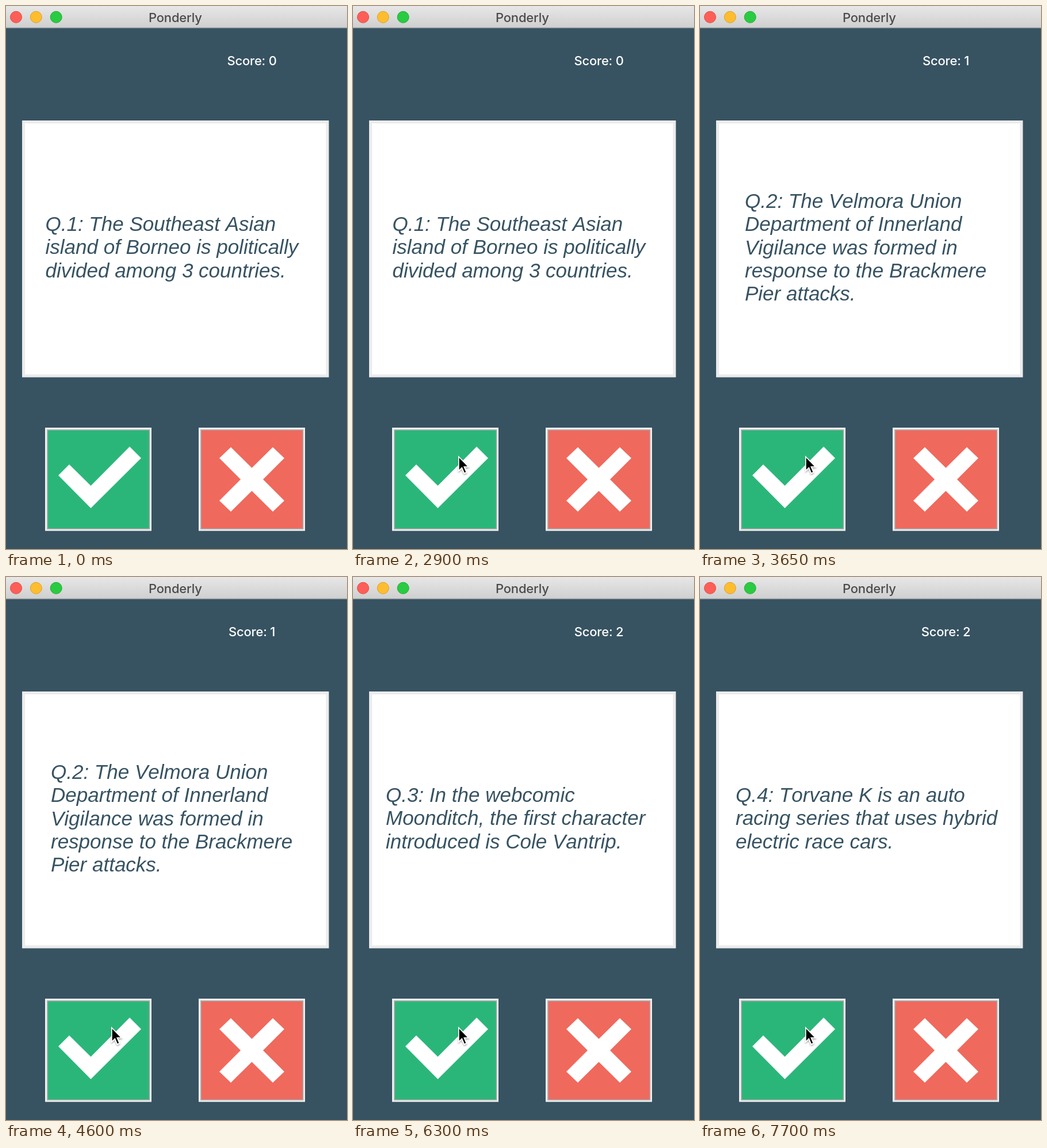
These frames come from a looping animation (593 by 944 pixels, 8000 ms). An HTML page:

```html
<!DOCTYPE html>
<html lang="en">
<head>
<meta charset="utf-8">
<title>Ponderly</title>
<style>
html, body { margin: 0; width: 100%; height: 100%; overflow: hidden; background: #375362; }
svg { display: block; width: 593px; height: 944px; }
.ui { font: 500 22px Inter, sans-serif; letter-spacing: -0.2px; text-anchor: middle; }
#question { font: italic 35px "Liberation Sans", Arial, sans-serif; font-kerning: none; fill: #375362; }
</style>
</head>
<body>
<svg viewBox="0 0 593 944">
  <defs>
    <linearGradient id="bar" x2="0" y2="1">
      <stop stop-color="#e7e7e7"/>
      <stop offset="1" stop-color="#cfcfcf"/>
    </linearGradient>
    <filter id="shadow" x="-50%" y="-50%" width="200%" height="200%">
      <feDropShadow dx="0" dy="2" stdDeviation="1.5" flood-opacity=".35"/>
    </filter>
  </defs>

  <rect width="593" height="944" fill="#375362"/>
  <rect width="593" height="38" fill="url(#bar)"/>
  <rect y="37" width="593" height="1.5" fill="#aeb0b1"/>
  <g stroke-width="1">
    <circle cx="17.5" cy="19.3" r="10" fill="#fc5f57" stroke="#e2483f"/>
    <circle cx="52.3" cy="19.3" r="10" fill="#fdbd2f" stroke="#dfa024"/>
    <circle cx="87.2" cy="19.3" r="10" fill="#29cb42" stroke="#1dac2c"/>
  </g>
  <text class="ui" x="294.3" y="28" fill="#4b4b4b">Ponderly</text>
  <text class="ui" id="score" x="427.6" y="103" fill="#fff"></text>

  <rect x="28" y="199" width="533.5" height="446.5" fill="#ecebec"/>
  <rect id="card" x="33" y="204" width="523.5" height="436.5"/>
  <text id="question"></text>

  <g fill="#f1f1f1">
    <rect x="68" y="733" width="185" height="179.5"/>
    <rect x="335" y="733" width="185" height="179.5"/>
  </g>
  <g stroke="#a9aaa9" stroke-width="1.6">
    <rect x="72" y="737" width="177.5" height="172" fill="#2bb679"/>
    <rect x="339" y="737" width="177.5" height="172" fill="#f0695d"/>
  </g>
  <g fill="#fff">
    <path d="M91 816 110 797 147.5 834 215 766 235 786 147.5 873Z"/>
    <path d="M371 786 391 767 427.5 803 464 767 484 786 447 823 484 860 464 879 427.5 843 391 879 371 860 408 823Z"/>
  </g>
  <path id="cursor" d="M.8 1.5V26L6.3 20.8 10.4 30.3 14.4 28.6 10.3 19.2H18Z"
        fill="#000" stroke="#fff" stroke-width="1.7" filter="url(#shadow)"/>
</svg>
<script>
const LOOP = 8000;
const WHITE = '#fff', GREEN = '#008000', RED = '#f00';

const questions = [
  { x: 68.5, y: 391, lines: ['Q.1: The Southeast Asian', 'island of Borneo is politically', 'divided among 3 countries.'] },
  { x: 78, y: 351, lines: ['Q.2: The Velmora Union', 'Department of Innerland', 'Vigilance was formed in', 'response to the Brackmere', 'Pier attacks.'] },
  { x: 57, y: 391, lines: ['Q.3: In the webcomic', 'Moonditch, the first character', 'introduced is Cole Vantrip.'] },
  { x: 62, y: 391, lines: ['Q.4: Torvane K is an auto', 'racing series that uses hybrid', 'electric race cars.'] }
];

// start time, question index, score, card colour
const states = [
  [0, 0, 0, WHITE],
  [3100, 0, 1, GREEN],
  [3650, 1, 1, WHITE],
  [4750, 1, 2, GREEN],
  [5750, 2, 2, WHITE],
  [6700, 2, 2, RED],
  [7700, 3, 2, WHITE]
];

const $ = id => document.getElementById(id);
let shown;

function showState(state) {
  if (state === shown) return;
  shown = state;
  const [, index, score, color] = state;
  const { x, y, lines } = questions[index];
  $('score').textContent = 'Score: ' + score;
  $('card').setAttribute('fill', color);
  $('question').innerHTML = lines
    .map((line, i) => `<tspan x="${x}" y="${y + i * 40.3}">${line}</tspan>`)
    .join('');
}

function moveCursor(t) {
  const p = Math.min(1, Math.max(0, (t - 2450) / 450));
  const left = (1 - p) ** 3;
  $('cursor').style.display = t < 2450 ? 'none' : '';
  $('cursor').setAttribute('transform', `translate(${183 + 60 * left} ${782 + 48 * left})`);
}

const start = performance.now();
function draw() {
  const t = (performance.now() - start) % LOOP;
  showState(states.findLast(s => s[0] <= t));
  moveCursor(t);
  requestAnimationFrame(draw);
}
draw();
</script>
</body>
</html>
```
